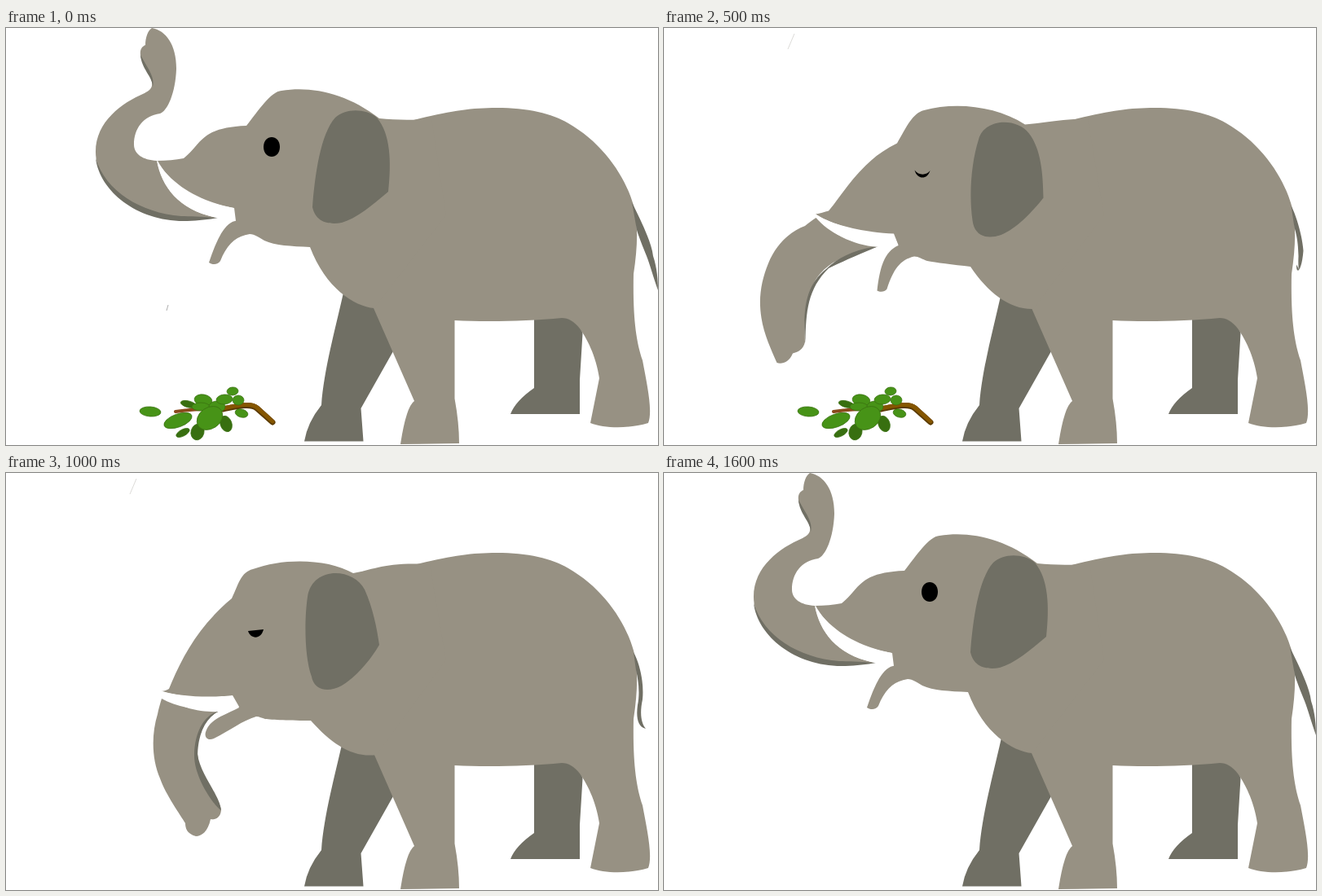
Animation of 800x512 px, one loop 1700 ms. Source, as an HTML page:

```html
<!DOCTYPE html>
<html lang="en">
<head>
<meta charset="utf-8">
<title>Elephant</title>
<style>
  html, body { margin: 0; width: 100%; height: 100%; overflow: hidden; background: #fff; }
  svg { display: block; width: 100vw; height: 100vh; }
  .skin { fill: #979183; }
  .shade { fill: #706f64; }
  .stem { fill: none; stroke: #855600; stroke-width: 5; stroke-linecap: round; stroke-linejoin: round; }
  .bark { stroke: #5a3a00; stroke-width: 7; }
  .twig { stroke: #8a4a1c; stroke-width: 4; }
  .hair { fill: none; stroke: #d4d2ce; stroke-width: .8; }
  ellipse { stroke: #386f10; stroke-width: .7; }
</style>
</head>
<body>
<svg viewBox="0 0 800 512">
  <path class="hair" id="hair" d="M160 7L152 26"/>
  <path class="hair" id="speck" d="M199 340L197 347" style="stroke:#999"/>

  <path class="shade" d="M414 325C404 370 390 420 387 463Q370 484 366 507.500H438.500L435.500 467L475 397L460 335Z"/>
  <path class="shade" d="M648 350V442Q625 458 619 474H704V432L707.500 375L700 350Z"/>

  <g id="back">
    <path class="stem twig" d="M208 471Q238 467 266 468"/>
    <path class="stem bark" d="M266 468C282 465 300 460 308 467L327 484"/>
    <path class="stem" d="M266 467C282 464 300 459 308 466L327 483"/>
  </g>

  <path class="skin" d="M500 113C545 102 570 98 602 98C640 98 670 105 690 117C732 141 760 182 770 218C776 240 775 270 770 302C769 355 773 385 781 408C786 435 794 470 788 485C765 492 735 492 717 485L728 430C724 402 712 380 704 369C697 360 690 356 682 356C640 360 590 361 550.500 359L550.500 455Q556 485 556 510L484 511Q491 465 501 458L451 344L430 230Z"/>
  <path class="skin" id="head"/>
  <path class="skin" id="trunk"/>
  <path class="shade" id="under"/>
  <path id="tusk" fill="#fff"/>
  <path class="shade" id="ear"/>
  <path id="eye"/>
  <path class="shade" id="tail"/>
  <g id="front"></g>
</svg>

<script>
const $ = id => document.getElementById(id);
const PARTS = ['head', 'trunk', 'under', 'tusk', 'ear', 'eye', 'tail'];

// All poses of a part share one command structure, so they can be blended.
const up = {
  head: 'M452 344C427 342 392 319 373 269C350 268 330 267 317 261C309 256 304 253 299 253C281 256 271 266 263 286C260 291 253 291 249 288C257 264 267 240 281 237L279 221C240 213 205 195 185 163C197 163 208 162 218 160C240 143 238 122 295 120C310 101 325 78 338 77C375 71 418 80 458 111C480 113 505 114 522 110L540 230Z',
  trunk: 'M185 163C191 196 213 224 259 233C170 243 110 200 110 152C110 115 142 92 170 80C182 74 184 68 166 38C163 28 166 23 171 21C171 12 174 3 179 0C196 3 209 20 209 50C208 80 198 102 189 105C168 108 157 124 157 143C157 155 168 162 185 163Z',
  under: 'M260 233C248 235 232 237 218 237C160 237 115 200 110 160C122 200 165 227 215 231C225 231 245 232 260 233M165 33C166 50 180 60 180 72C183 60 174 50 165 33',
  tusk: 'M185 161C203 196 238 214 280 221L282 237L259 233C213 224 191 196 185 161Z',
  ear: 'M376 220C379 180 386 130 404 110C416 99 440 98 455 110C472 130 473 165 469 201C450 217 430 234 412 239C395 242 380 238 376 220Z',
  eye: 'M316 146C316 130 336 130 336 146C336 162 316 162 316 146Z',
  tail: 'M768 214C778 235 792 262 794 280C799 295 800 310 800 322C794 305 790 290 786 280C781 268 776 255 774 248Z'
};
const curl = {
  ...up,
  trunk: 'M185 163C191 196 213 224 259 233C170 243 110 200 110 157C110 145 114 140 113 121C110 103 98 98 85 106C75 111 66 110 61 108C52 114 42 112 41 102C42 80 60 62 95 61C125 64 139 81 142 92C157 118 156 130 157 143C157 155 168 162 185 163Z',
  under: up.under.split('M165')[0] + 'M62 109C72 117 95 98 112 118C102 96 86 104 62 109',
  eye: 'M316 145C322 142 331 142 337 144C336 163 318 163 316 145Z',
  tail: 'M768 214C778 235 786 258 793 275C799 295 794 312 787 328C790 312 790 300 788 285C785 270 778 255 774 248Z'
};
const reach = {
  head: 'M452 344C424 342 395 317 378 282C360 277 340 273 328 270C320 267 314 262 307 262C289 266 280 278 270 297C267 301 261 301 257 299C262 272 273 250 289 246L285 233C250 228 203 213 182 189C190 187 197 185 204 184C232 169 250 136 295 129C309 108 322 87 335 84C375 77 420 86 460 114C480 115 505 115 520 111L540 230Z',
  trunk: 'M182 189C195 216 225 240 265 245C235 247 195 243 172 239C140 238 120 250 112 256C95 268 92 285 93 304C94 312 88 310 86 311C85 328 78 334 70 334C58 332 45 312 45 287C47 262 58 240 75 223C95 205 128 193 160 190C168 188 175 188 182 189Z',
  under: 'M265 245C235 250 200 251 172 240C120 240 95 265 94 308C90 270 113 236 172 236C200 243 230 245 265 245M93 300C93 300 93 300 93 300C93 300 93 300 93 300',
  tusk: 'M181 188C203 213 250 228 286 232L289 246L265 245C225 240 195 216 181 188Z',
  ear: 'M382 222C382 185 388 150 402 122C410 107 440 104 455 115C476 132 475 170 473 206C458 220 435 243 415 247C395 251 383 242 382 222Z',
  eye: 'M318 156C323 163 333 163 337 158C333 169 321 168 318 156Z',
  tail: 'M769 216C776 232 785 256 790 275C789 303 768 306 758 290C770 297 783 297 784 275C781 262 778 255 774 248Z'
};
const grab = {
  head: 'M455 346C425 350 400 333 374 304C350 304 325 303 318 302C314 301 311 299 307 299C290 303 283 315 277 344C274 348 269 348 266 346C268 315 267 300 286 288L278 274C262 279 215 275 190 268C193 268 197 267 200 265C215 228 235 189 277 154C286 135 288 122 303 118C340 104 395 105 426 123C450 119 465 109 520 112L540 230Z',
  trunk: 'M191 277C210 288 240 292 262 291C245 304 236 320 232 345C231 370 236 395 242 415C249 435 253 450 253 467C248 478 240 486 230 488C222 494 210 492 207 488C206 460 200 440 194 425C184 400 181 380 181 355C180 325 184 305 186 296C187 290 189 284 191 277Z',
  under: 'M262 291C245 304 233 325 232 350C233 400 253 430 253 466C252 440 227 400 227 355C228 320 242 297 262 291M230 350C230 350 230 350 230 350C230 350 230 350 230 350',
  tusk: 'M186 266C215 277 262 275 278 273L286 287L262 293C240 294 210 290 186 266Z',
  ear: 'M375 250C366 225 366 180 370 152C376 114 426 116 440 143C450 165 455 190 458 211C447 230 430 250 412 261C395 270 378 267 375 250Z',
  eye: 'M297 193C302 200 312 199 316 192C313 205 300 204 297 193Z',
  tail: 'M770 220C778 235 781 255 779 272C776 295 783 302 794 291C793 303 772 308 773 285C775 265 775 255 773 242Z'
};
const lift = {
  ...grab,
  trunk: 'M191 277C210 288 240 292 262 292C245 300 236 318 235 340C235 358 240 370 246 380C254 393 262 402 264 414C263 424 256 426 251 425C248 440 240 446 233 446C222 443 220 436 220 430C214 420 196 395 189 375C179 352 178 322 186 296C187 290 189 284 191 277Z',
  under: 'M262 292C245 300 236 320 235 345C238 370 262 395 264 414C258 412 230 375 231 345C232 315 245 296 262 292M233 345C233 345 233 345 233 345C233 345 233 345 233 345',
  eye: 'M297 194C303 193 310 193 316 192C313 205 300 204 297 194Z',
  tail: 'M770 220C778 235 783 258 781 278C777 297 780 308 785 314C775 312 773 300 775 285C778 270 776 255 773 242Z'
};
const chew = {
  ...lift,
  head: grab.head.replace(/C290 303.*286 288L/, 'C290 304 275 316 255 326C248 329 243 325 245 318C250 303 262 300 286 288L')
};

const STEP = 100, STEPS = 17;
const keys = [up, curl, reach, grab, lift, chew, reach, curl, up]; // one every two steps
const carry = { 7: [8, -30], 8: [15, -58], 9: [28, -82] };

// x, y, rx, ry, angle, dark
const backLeaves = [
  [177, 471, 13, 6, 4, 0], [224, 462, 10, 4, 15, 1], [211, 482, 18, 8, -20, 0],
  [242, 457, 11, 7, 10, 0], [217, 497, 9, 4, -28, 1], [239, 465, 11, 5, 0, 0]
];
const frontLeaves = [
  [235, 496, 8, 10, 15, 1], [270, 486, 7, 10, -20, 1], [259, 465, 10, 7, 0, 0],
  [250, 479, 17, 13, -35, 0], [268, 456, 10, 6, -5, 0], [278, 446, 7, 5, -5, 0],
  [285, 457, 7, 6, 0, 0], [289, 473, 8, 5, 15, 0]
];

function addLeaves(group, leaves) {
  for (const [x, y, rx, ry, angle, dark] of leaves) {
    const leaf = document.createElementNS('http://www.w3.org/2000/svg', 'ellipse');
    const attrs = { rx, ry, fill: dark ? '#386f10' : '#479317', transform: `translate(${x} ${y}) rotate(${angle})` };
    for (const name in attrs) leaf.setAttribute(name, attrs[name]);
    group.append(leaf);
  }
}

function blend(a, b, k) {
  const to = b.match(/\d+/g);
  let i = 0;
  return a.replace(/\d+/g, n => +n + (to[i++] - n) * k);
}

function draw(step) {
  const i = step >> 1, k = step % 2 / 2;
  const a = keys[i], b = keys[i + 1] || a;
  for (const part of PARTS) $(part).setAttribute('d', blend(a[part], b[part], k));

  const [dx, dy] = carry[step] || [0, 0];
  for (const id of ['back', 'front']) {
    $(id).setAttribute('transform', `translate(${dx} ${dy})`);
    $(id).style.display = step < 10 ? '' : 'none';
  }
  $('hair').style.display = step > 0 && step < 16 ? '' : 'none';
  $('speck').style.display = step < 5 ? '' : 'none';
}

addLeaves($('back'), backLeaves);
addLeaves($('front'), frontLeaves);

let shown = -1;
const start = performance.now();
function tick() {
  const step = Math.floor((performance.now() - start) / STEP) % STEPS;
  if (step !== shown) draw(shown = step);
  requestAnimationFrame(tick);
}
tick();
</script>
</body>
</html>
```
